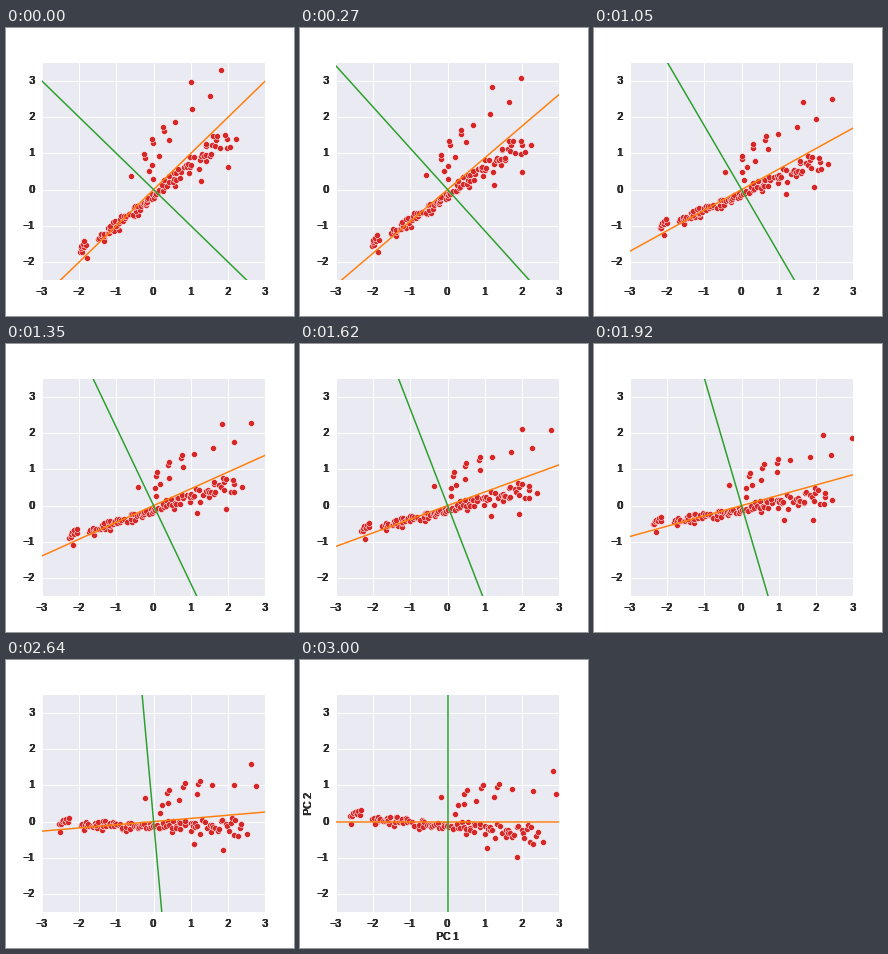
Recreate the animation shown at these times as a matplotlib script. Size 288x288 px, loop 6.03 s.

```python
import numpy as np
import matplotlib.pyplot as plt
from matplotlib.animation import FuncAnimation

SIZE, DPI = 288, 72
STEPS, FRAMES, INTERVAL = 100, 201, 30
INK = "#262626"
plt.rcParams["font.family"] = "Liberation Sans"
rng = np.random.default_rng(4)


def make_points():
    """Cloud in principal-component coordinates."""
    # Main trend: dense on the left, fanning out to the right
    n = 104
    x = -2 + 4.4 * np.linspace(0, 1, n) ** 1.15 + rng.normal(0, .03, n)
    spread = .075 + .035 * np.clip(x, 0, None)
    trend = x, -.13 - .09 * x + spread * np.clip(rng.normal(size=n), -1.8, 1.8)

    # Small separate group at the far left
    cluster = np.linspace(-2.62, -2.32, 8), rng.normal(.23, .05, 8)

    # Two rising rows above the trend, the upper one in close pairs
    row_x = .27 * 1.67 ** np.arange(4)
    row = row_x, .4 + .22 * row_x
    k, side = np.repeat(np.arange(3), 2), np.tile([-1, 1], 3)
    pairs = .48 + .44 * k + .033 * side, 1 - .18 * .2 ** k + .045 * side

    outliers = np.transpose([(3.61, 1.05), (2.83, 1.39), (2.91, .75), (2.30, .84),
                             (1.72, .91), (-.17, .69), (.19, .22), (1.86, -.98),
                             (1.06, -.74), (2.56, -.57), (-2.61, -.08)])
    return np.hstack([cluster, trend, row, pairs, outliers]).T


projected = make_points()
axis_1 = np.array([(-9, 0), (9, 0)])
axis_2 = np.array([(0, -9), (0, 9)])

c = np.sqrt(.5)
ROTATION = np.array([(c, c), (-c, c)])


def blend(pcs, t):
    """Straight-line move from the raw position to the projected one."""
    return (1 - t) * (pcs @ ROTATION) + t * pcs


fig = plt.figure(figsize=(SIZE / DPI, SIZE / DPI), dpi=DPI, facecolor="white")
ax = fig.add_axes([.125, .125, .775, 217 / SIZE], facecolor="#EAEAF2")
ax.set(xlim=(-3, 3), ylim=(-2.5, 3.5), xticks=range(-3, 4), yticks=range(-2, 4))
ax.grid(color="white", lw=1)
ax.set_axisbelow(True)
ax.tick_params(length=0, labelbottom=False, labelleft=False)
ax.spines[:].set_visible(False)


def heavy(text, anchor, coords, offset=(0, 0), ha="center", va="center", rotation=0):
    """Overprint text one pixel apart along its direction for a heavy look."""
    dx, dy = (0, 1) if rotation else (1, 0)
    return [ax.annotate(text, anchor, xycoords=coords, textcoords="offset points",
                        xytext=(offset[0] - s * dx, offset[1] - s * dy),
                        ha=ha, va=va, rotation=rotation, color=INK, fontsize=10,
                        annotation_clip=False)
            for s in (0, 0, 1, 1)]


for v in range(-3, 4):
    label = str(v).replace("-", "\u2212")
    heavy(label, (v, 0), ("data", "axes fraction"), (0, -7), va="top")
    if v > -3:
        heavy(label, (0, v), ("axes fraction", "data"), (-7, 0), ha="right")

titles = heavy("PC 1", (148, 11), "figure pixels")
titles += heavy("PC 2", (9, 145), "figure pixels", rotation=90)

dots = ax.scatter(*projected.T, s=36, color="#d62728", edgecolors="white",
                  linewidths=.48, zorder=1.5)
line_1, = ax.plot([], [], color="#ff7f0e", lw=1.5)
line_2, = ax.plot([], [], color="#2ca02c", lw=1.5)


def update(i):
    t = min(i / STEPS, 1)
    dots.set_offsets(blend(projected, t))
    line_1.set_data(*blend(axis_1, t).T)
    line_2.set_data(*blend(axis_2, t).T)
    for title in titles:
        title.set_visible(i >= STEPS)
    return [dots, line_1, line_2, *titles]


anim = FuncAnimation(fig, update, frames=FRAMES, interval=INTERVAL, repeat=True, repeat_delay=0)
plt.show()
```
